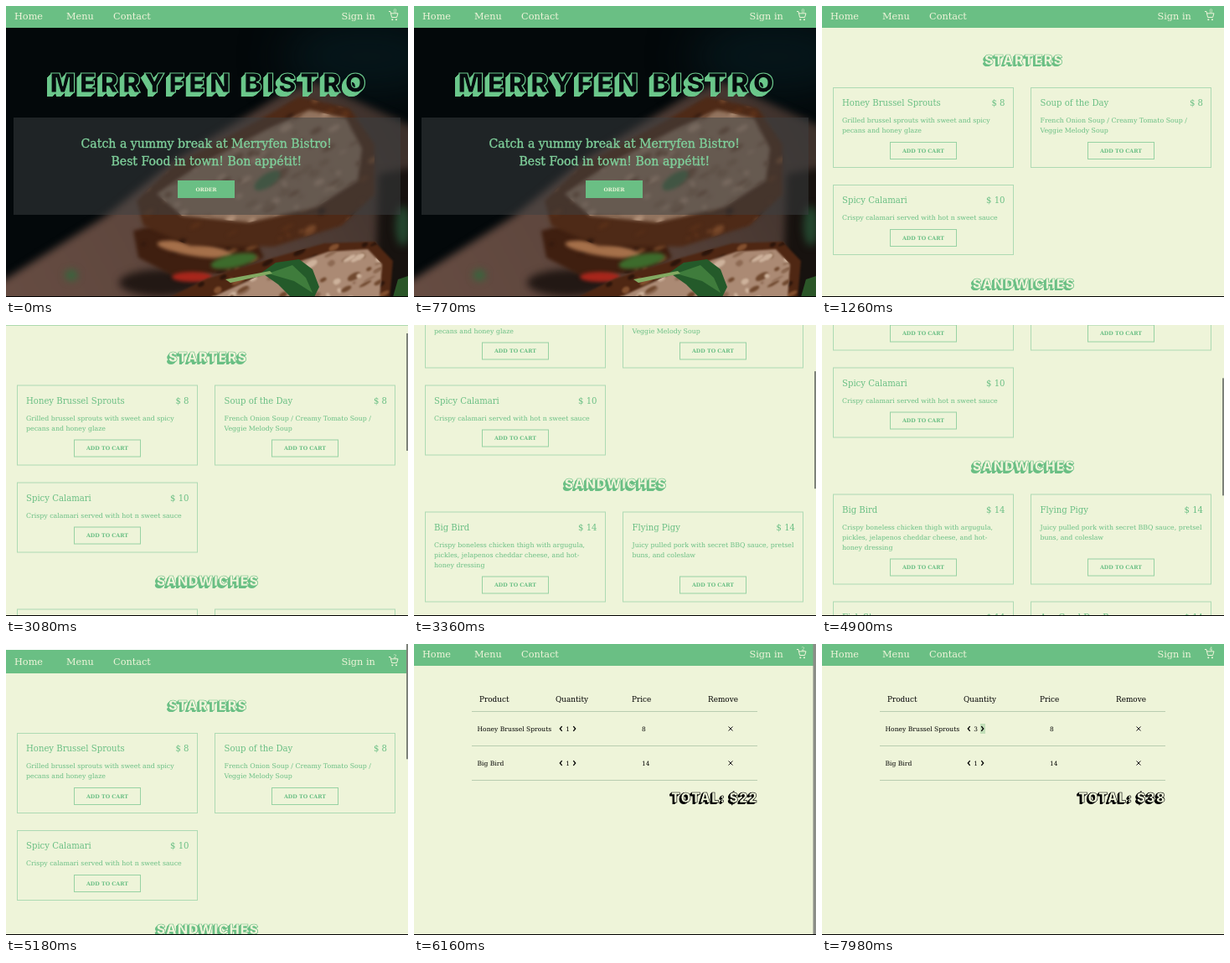
An HTML page with a canvas that plays this animation: 480 by 347 pixels, repeating every 8000 ms.

```html
<!DOCTYPE html>
<html lang="en">
<head>
<meta charset="utf-8">
<title>Merryfen Bistro</title>
<style>
html, body { margin: 0; width: 100%; height: 100%; overflow: hidden; background: #eef4d9; }
canvas { display: block; width: 480px; height: 347px; }
</style>
</head>
<body>
<canvas id="stage" width="480" height="347"></canvas>
<script>
const W = 480, H = 347, LOOP = 8000, STEP = 70;
const GREEN = '#6abf84', CREAM = '#eef4d9', PINK = '#f0a999', LINE = '#addab3';
const SERIF = '"DejaVu Serif", "Noto Serif", serif';
const HEAVY = 'Inter, Roboto, sans-serif';
const ctx = document.getElementById('stage').getContext('2d');

const clamp = v => Math.max(0, Math.min(1, v));
const ramp = (t, a, b) => clamp((t - a) / (b - a));
const smooth = v => v * v * (3 - 2 * v);
const easeOut = v => 1 - Math.pow(1 - v, 1.6);

function text(s, x, y, size, color, align = 'left', weight = 400) {
  ctx.font = `${weight} ${size}px ${SERIF}`;
  ctx.textAlign = align;
  ctx.fillStyle = color;
  ctx.fillText(s, x, y);
}

function path(c, pts, close) {
  c.beginPath();
  for (let i = 0; i < pts.length; i += 2) c.lineTo(pts[i], pts[i + 1]);
  if (close) c.closePath();
}

function frame(x, y, w, h, color) {
  ctx.strokeStyle = color;
  ctx.lineWidth = 1;
  ctx.strokeRect(x + 0.5, y + 0.5, w - 1, h - 1);
}

// Block lettering with an extrusion towards the lower left
function blockText(s, x, y, size, align, ink, face, depth, gap) {
  ctx.font = `900 ${size}px ${HEAVY}`;
  ctx.letterSpacing = gap + 'px';
  ctx.textAlign = 'left';
  ctx.lineJoin = 'miter';
  ctx.miterLimit = 3;
  const w = ctx.measureText(s).width - gap;
  const left = align === 'center' ? x - w / 2 : x - w;
  ctx.fillStyle = ctx.strokeStyle = ink;
  ctx.lineWidth = size / 26;
  for (let d = depth; d >= 0; d -= 0.5) ctx.fillText(s, left - d, y + d);
  ctx.fillStyle = face;
  ctx.fillText(s, left, y);
  ctx.strokeText(s, left, y);
  ctx.letterSpacing = '0px';
}

function blob(c, color, x, y, rx, ry, turn = 0) {
  c.fillStyle = color;
  c.beginPath();
  c.ellipse(x, y, rx, ry, turn, 0, Math.PI * 2);
  c.fill();
}

function poly(c, color, pts) {
  path(c, pts, true);
  c.fillStyle = color;
  c.fill();
}

let seed = 7;
const rnd = () => (seed = (seed * 16807) % 2147483647) / 2147483647;

// A slice of bread: filled outline with random crumbs inside
function slice(c, color, pts, crumbs, count) {
  poly(c, color, pts);
  c.save();
  c.clip();
  const xs = pts.filter((v, i) => i % 2 === 0), ys = pts.filter((v, i) => i % 2);
  const x0 = Math.min(...xs), y0 = Math.min(...ys);
  const w = Math.max(...xs) - x0, h = Math.max(...ys) - y0;
  for (let i = 0; i < count; i++) {
    blob(c, crumbs[i % crumbs.length], x0 + rnd() * w, y0 + rnd() * h,
      2 + rnd() * 7, 1 + rnd() * 3, -0.5);
  }
  c.restore();
}

function makePhoto() {
  const cv = document.createElement('canvas');
  cv.width = W;
  cv.height = H;
  const c = cv.getContext('2d');
  c.fillStyle = '#03080a';
  c.fillRect(0, 0, W, H);
  c.filter = 'blur(25px)';
  blob(c, '#06161a', 430, 60, 100, 45);
  c.filter = 'blur(5px)';
  const wood = c.createLinearGradient(0, 340, 460, 100);
  wood.addColorStop(0, '#664c42');
  wood.addColorStop(0.45, '#5c453c');
  wood.addColorStop(1, '#3c302b');
  poly(c, wood, [-20, 338, 120, 250, 200, 185, 330, 105, 368, 90, 500, 150, 500, 370, -20, 370]);
  poly(c, '#17120f', [445, 200, 500, 190, 500, 360, 440, 360]);
  blob(c, '#221814', 185, 330, 50, 16);
  blob(c, '#2e6b3c', 78, 321, 7, 6);
  blob(c, '#24472f', 474, 262, 9, 24);
  c.filter = 'blur(2px)';
  slice(c, '#3f1f10', [152, 268, 190, 258, 300, 282, 308, 300, 270, 318, 200, 322, 158, 300], ['#7d4d2c', '#25120b'], 22);
  blob(c, '#a5704a', 225, 290, 45, 8, 0.15);
  blob(c, '#a8261b', 222, 323, 24, 6);
  blob(c, '#3d6b2c', 272, 304, 28, 8, -0.2);
  slice(c, '#4e2a17', [156, 232, 200, 190, 300, 137, 350, 108, 410, 122, 440, 165, 440, 225, 400, 262, 320, 287, 220, 286, 164, 262], ['#2c160d', '#7a4a2b', '#5d3219'], 90);
  slice(c, '#92745f', [180, 224, 230, 190, 310, 148, 362, 124, 406, 134, 425, 170, 420, 208, 370, 240, 290, 258, 210, 250], ['#6d4a35', '#b3937b', '#84654f'], 110);
  blob(c, '#466b45', 312, 208, 18, 8, -0.6);
  c.filter = 'blur(1px)';
  slice(c, '#4f2713', [190, 350, 240, 325, 320, 300, 380, 283, 440, 281, 462, 304, 458, 350], ['#2c150b', '#82502f'], 50);
  slice(c, '#ab8a74', [240, 350, 310, 318, 385, 293, 432, 290, 449, 308, 446, 350], ['#70492f', '#cdb29c', '#8d6a53'], 60);
  c.filter = 'none';
  poly(c, '#245a2a', [305, 318, 322, 306, 350, 302, 366, 314, 374, 335, 368, 347, 340, 347, 325, 332]);
  poly(c, '#3f7c3c', [313, 319, 342, 309, 358, 324, 366, 342, 344, 328]);
  poly(c, '#83aa62', [262, 326, 315, 316, 318, 319, 268, 330]);
  poly(c, '#2b5628', [462, 347, 468, 326, 480, 322, 480, 347]);
  return cv;
}
const photo = makePhoto();

function nav(count) {
  ctx.fillStyle = GREEN;
  ctx.fillRect(0, -2, W, 28);
  [['Home', 10], ['Menu', 72], ['Contact', 128], ['Sign in', 400.5]]
    .forEach(([s, x]) => text(s, x, 16, 11.3, CREAM));
  ctx.save();
  ctx.translate(457, 6);
  ctx.strokeStyle = CREAM;
  ctx.lineWidth = 1;
  path(ctx, [0, 0.5, 2, 0.5, 3.6, 7.5, 9.6, 7.5, 11, 2.8, 2.6, 2.8]);
  ctx.stroke();
  blob(ctx, CREAM, 4.3, 10.3, 1, 1);
  blob(ctx, CREAM, 9, 10.3, 1, 1);
  ctx.restore();
  text(count, 464.5, 7.5, 6.2, CREAM, 'center');
}

function hero() {
  ctx.drawImage(photo, 0, 0);
  nav(0);
  blockText('MERRYFEN BISTRO', 241, 103, 32, 'center', '#6bc78b', '#050c0e', 5, 5.1);
  ctx.fillStyle = 'rgba(60,64,66,0.5)';
  ctx.fillRect(9, 133, 462, 116);
  const mint = '#7fd09b';
  ctx.strokeStyle = mint;
  ctx.lineWidth = 0.35;
  [['Catch a yummy break at Merryfen Bistro!', 169], ['Best Food in town! Bon appétit!', 190]]
    .forEach(([s, y]) => {
      text(s, 239.3, y, 14.1, mint, 'center');
      ctx.strokeText(s, 239.3, y);
    });
  ctx.fillStyle = GREEN;
  ctx.fillRect(205, 208, 68, 21);
  text('ORDER', 239, 220.5, 6, CREAM, 'center', 700);
}

const dishes = [
  [0, 97, 96, 'Honey Brussel Sprouts', 8, 'Grilled brussel sprouts with sweet and spicy|pecans and honey glaze'],
  [1, 97, 96, 'Soup of the Day', 8, 'French Onion Soup / Creamy Tomato Soup /|Veggie Melody Soup'],
  [0, 213, 84, 'Spicy Calamari', 10, 'Crispy calamari served with hot n sweet sauce'],
  [0, 364, 108, 'Big Bird', 14, 'Crispy boneless chicken thigh with argugula,|pickles, jelapenos cheddar cheese, and hot-|honey dressing'],
  [1, 364, 108, 'Flying Pigy', 14, 'Juicy pulled pork with secret BBQ sauce, pretsel|buns, and coleslaw'],
  [0, 492, 96, 'Fish Story', 14, 'Battered cod filet served between a brioche roll|with lettuce and garlic-thyme aioli'],
  [1, 492, 96, 'Avo Good Day Burger', 14, 'Veggie burger topped with a sunny-side up egg,|melted Asiago cheese, and fresh guacamole']
];

function card([col, y, h, name, price, info], hover) {
  const x = 13 + col * 236.5;
  frame(Math.floor(x), y, 216, h, LINE);
  text(name, x + 11, y + 22, 10.1, GREEN);
  text('$ ' + price, x + 205.5, y + 22, 10.1, GREEN, 'right');
  info.split('|').forEach((s, i) => text(s, x + 11, y + 42 + i * 12, 7.85, GREEN));
  const bx = Math.floor(x + 68), by = y + h - 31;
  frame(bx, by, 80, 21, '#97d2a3');
  if (hover > 0) {
    ctx.globalAlpha = hover;
    ctx.fillStyle = PINK;
    ctx.fillRect(bx, by, 80, 21);
    ctx.globalAlpha = 1;
  }
  text('ADD TO CART', bx + 40, by + 12.8, 6.3, hover > 0.5 ? CREAM : GREEN, 'center', 700);
}

function scrollAt(t) {
  if (t < 3080) return 0;
  if (t < 4830) return 25.5 + 225.5 * easeOut(ramp(t, 3080, 3850));
  if (t < 5110) return 251 * (1 - smooth(ramp(t, 4760, 5110)));
  if (t < 5250) return -13 * Math.sin(ramp(t, 5110, 5250) * Math.PI / 2);
  return -13 * (1 - smooth(ramp(t, 5250, 5600)));
}

function menu(t) {
  const top = Math.round(scrollAt(t) * 2) / 2;
  ctx.fillStyle = CREAM;
  ctx.fillRect(0, 0, W, H);
  if (top < 0) {
    ctx.fillStyle = '#fff';
    ctx.fillRect(0, 0, W, -top);
  }
  ctx.save();
  ctx.translate(0, -top);
  nav(t < 2310 ? 0 : t < 4060 ? 1 : 2);
  blockText('STARTERS', 240.5, 69.5, 16, 'center', GREEN, CREAM, 2.5, 1.1);
  blockText('SANDWICHES', 240.5, 336.5, 16, 'center', GREEN, CREAM, 2.5, 1);
  const hovers = {
    0: ramp(t, 2030, 2170) - ramp(t, 2590, 2800),
    3: ramp(t, 3850, 3990) - ramp(t, 4340, 4550)
  };
  dishes.forEach((d, i) => card(d, hovers[i] || 0));
  ctx.restore();
  const bar = t < 4500 ? ramp(t, 3010, 3080) - ramp(t, 3990, 4200)
                       : ramp(t, 4760, 4830) - ramp(t, 5600, 5810);
  if (bar > 0) {
    ctx.globalAlpha = bar;
    ctx.fillStyle = '#7c8179';
    ctx.fillRect(478, Math.max(0, top * 0.39), 2, 140 + Math.min(0, top * 0.3));
    ctx.globalAlpha = 1;
  }
}

function chevron(x, y, dir) {
  path(ctx, [x - dir * 1.2, y - 2.8, x + dir * 1.2, y, x - dir * 1.2, y + 2.8]);
  ctx.strokeStyle = '#000';
  ctx.lineWidth = 1.3;
  ctx.stroke();
}

function cart(t) {
  const qty = t < 7280 ? 1 : t < 7770 ? 2 : 3;
  ctx.fillStyle = CREAM;
  ctx.fillRect(0, 0, W, H);
  nav(qty + 1);
  [['Product', 78], ['Quantity', 169], ['Price', 260], ['Remove', 351]]
    .forEach(([s, x]) => text(s, x, 68.5, 8.9, '#000'));
  ctx.fillStyle = '#b9cdb0';
  for (const y of [80, 121, 162]) ctx.fillRect(69, y, 341, 1);
  if (t >= 7770) {
    ctx.fillStyle = '#c2dfb8';
    ctx.fillRect(189, 95, 6, 12);
  }
  [['Honey Brussel Sprouts', qty, 8], ['Big Bird', 1, 14]].forEach(([s, n, cost], i) => {
    const y = 101 + i * 41;
    text(s, 75.5, y + 2.5, 7.6, '#000');
    chevron(175.5, y, -1);
    text(n, 183.5, y + 2.5, 7.4, '#000', 'center');
    chevron(191.5, y, 1);
    text(cost, 272, y + 2.5, 7.4, '#000');
    ctx.lineWidth = 0.9;
    for (const k of [-1, 1]) {
      path(ctx, [375.5, y - 2.5 * k, 380.5, y + 2.5 * k]);
      ctx.stroke();
    }
  });
  blockText('TOTAL: $' + (qty * 8 + 14), 409.5, 188.5, 15.6, 'right', '#000', CREAM, 2.3, 1.2);
  const bar = 1 - ramp(t, 6230, 6580);
  if (bar > 0) {
    ctx.globalAlpha = bar;
    ctx.fillStyle = '#8b8e88';
    ctx.fillRect(476.5, 0, 3.5, 346);
    ctx.globalAlpha = 1;
  }
}

function draw(now) {
  const t = Math.floor((now % LOOP) / STEP) * STEP;
  if (t < 910) hero();
  else if (t < 5950) menu(t);
  else cart(t);
  ctx.fillStyle = '#000';
  ctx.fillRect(0, 346, W, 1);
  requestAnimationFrame(() => draw(performance.now() - start));
}
const start = performance.now();
draw(0);
</script>
</body>
</html>
```
